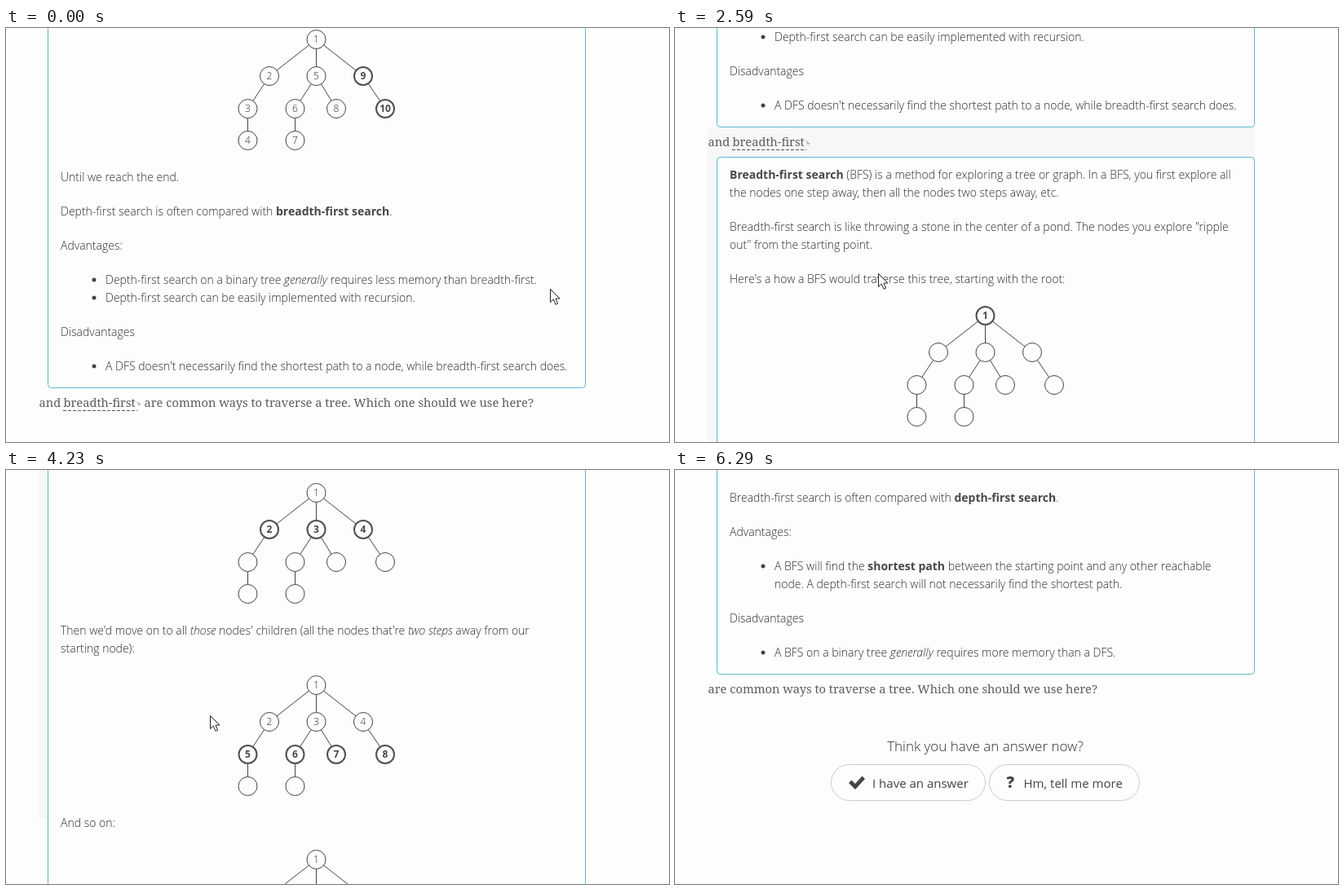
Recreate the animation shown at these times as an HTML page. Size 813 by 508 pixels, loop 6.54 s.

```html
<!DOCTYPE html>
<html lang="en">
<head>
<meta charset="utf-8">
<title>Tree traversal notes</title>
<style>
  html, body { margin: 0; width: 100%; height: 100%; overflow: hidden; background: #fdfdfd; }
  svg { display: block; width: 813px; height: 508px; }
  text { font: 300 14px "Open Sans", sans-serif; fill: #2c2c2c; white-space: pre; }
  .b { font-weight: 700; fill: #484848; }
  .i { font-style: italic; }
  .num { font-size: 12px; text-anchor: middle; }
  .serif { font: 400 14.64px "Noto Serif", serif; fill: #5c5c5c; }
  .ask { font-size: 17px; text-anchor: middle; }
  .label { font-size: 15px; font-weight: 400; fill: #444; }
  .mark { font-size: 19px; font-weight: 800; fill: #444; }
  .panel { fill: #fdfdfd; stroke: #5bbad0; }
  .edge { stroke: #444; }
  .node { fill: #fdfdfd; stroke: #444; }
  .node.b { stroke: #505050; stroke-width: 2; }
  .pill { fill: #fdfdfd; stroke: #ccc; }
</style>
</head>
<body>
<svg id="stage" viewBox="0 0 813 508"></svg>
<script>
const LOOP = 6540;
const SHIFT = 1323; // how far the open panel pushes the rest down
const LINE = 22, PARA = 42;
const stage = document.getElementById('stage');

function add(parent, tag, attrs = {}, content) {
  const el = document.createElementNS('http://www.w3.org/2000/svg', tag);
  for (const k in attrs) el.setAttribute(k, attrs[k]);
  if (content !== undefined) el.textContent = content;
  parent.appendChild(el);
  return el;
}

// *bold* and _italic_ runs; y is the middle of the line
function line(parent, x, y, str) {
  const el = add(parent, 'text', { x, y: y + 5 });
  for (const run of str.split(/(\*[^*]+\*|_[^_]+_)/)) {
    if (!run) continue;
    const cls = { '*': 'b', '_': 'i' }[run[0]];
    add(el, 'tspan', cls ? { class: cls } : {}, cls ? run.slice(1, -1) : run);
  }
}

// each node: x, parent; listed level by level
const NODES = [[380.5, -1], [323, 0], [380.5, 0], [438, 0], [296.5, 1],
  [354.5, 2], [405, 2], [465, 3], [296.5, 4], [354.5, 5]];
const LEVELS = [0, 45, 85, 124];
const depth = i => i ? 1 + depth(NODES[i][1]) : 0;
const nodeY = i => LEVELS[depth(i)];

const byLevel = NODES.map((_, i) => i);
const byBranch = [];
(function visit(i) {
  byBranch.push(i);
  byLevel.filter(k => NODES[k][1] === i).forEach(visit);
})(0);

// numbers nodes 1..last in visiting order, the ones from first on in bold
function tree(parent, y, order, first, last) {
  const g = add(parent, 'g', { transform: `translate(0 ${y})` });
  NODES.forEach(([x, up], i) => {
    if (i) add(g, 'line', { class: 'edge', x1: NODES[up][0], y1: nodeY(up), x2: x, y2: nodeY(i) });
  });
  NODES.forEach(([x], i) => {
    const n = order.indexOf(i) + 1;
    const bold = n >= first && n <= last;
    const weight = bold ? ' b' : '';
    add(g, 'circle', { class: 'node' + weight, cx: x, cy: nodeY(i), r: bold ? 11 : 11.5 });
    if (n <= last) add(g, 'text', { class: 'num' + weight, x, y: nodeY(i) + 4.3 }, n);
  });
}

// stacks paragraphs, "- " lists and trees downwards from y
function flow(parent, y, blocks) {
  for (const block of blocks) {
    if (Array.isArray(block)) {
      tree(parent, y + 3, ...block);
      y += 172;
      continue;
    }
    const rows = block.split('\n');
    const list = rows[0].startsWith('- ');
    rows.forEach((row, i) => {
      const cy = y + LINE * i;
      const dot = row.startsWith('- ');
      if (dot) add(parent, 'circle', { cx: 108, cy, r: 2.5, fill: '#444' });
      line(parent, list ? 122 : 67, cy, dot ? row.slice(2) : row);
    });
    y += LINE * (rows.length - 1) + PARA;
  }
}

function panel(parent, top, bottom) {
  add(parent, 'rect', { class: 'panel', x: 51.5, y: top, width: 659, height: bottom - top, rx: 4 });
}

const page = add(stage, 'g');

panel(page, -600.5, 441.5);
flow(page, 11, [
  [byBranch, 9, 10],
  'Until we reach the end.',
  'Depth-first search is often compared with *breadth-first search*.',
  'Advantages:',
  '- Depth-first search on a binary tree _generally_ requires less memory than breadth-first.\n' +
  '- Depth-first search can be easily implemented with recursion.',
  'Disadvantages',
  "- A DFS doesn't necessarily find the shortest path to a node, while breadth-first search does."
]);

const more = add(page, 'g');
add(more, 'rect', { x: 40, y: 442, width: 671, height: 844, fill: '#f7f7f7' });
panel(more, 478.5, 1764.5);
flow(more, 500, [
  '*Breadth-first search* (BFS) is a method for exploring a tree or graph. In a BFS, you first explore all\n' +
  'the nodes one step away, then all the nodes two steps away, etc.',
  'Breadth-first search is like throwing a stone in the center of a pond. The nodes you explore "ripple\n' +
  'out" from the starting point.',
  "Here's a how a BFS would traverse this tree, starting with the root:",
  [byLevel, 1, 1],
  "We'd visit all the immediate children (all the nodes that're one step away from our starting node):",
  [byLevel, 2, 4],
  "Then we'd move on to all _those_ nodes' children (all the nodes that're _two steps_ away from our\n" +
  'starting node):',
  [byLevel, 5, 8],
  'And so on:',
  [byLevel, 9, 10],
  'Until we reach the end.',
  'Breadth-first search is often compared with *depth-first search*.',
  'Advantages:',
  '- A BFS will find the *shortest path* between the starting point and any other reachable\n' +
  'node. A depth-first search will not necessarily find the shortest path.',
  'Disadvantages',
  '- A BFS on a binary tree _generally_ requires more memory than a DFS.'
]);

// sentence with the expandable term
add(page, 'text', { class: 'serif', x: 40.5, y: 465 }, 'and');
add(page, 'text', { class: 'serif', x: 70.5, y: 465 }, 'breadth-first');
add(page, 'path', { d: 'M70 469.5H161', stroke: '#555', 'stroke-dasharray': '4 2' });
add(page, 'path', { d: 'M160.5 459q3 0 3 3.5m-2 -1.5l2 2l2 -2', fill: 'none', stroke: '#7fa9b2' });

const tail = add(page, 'g');
const rest = add(tail, 'text', { class: 'serif', y: 465 },
  'are common ways to traverse a tree. Which one should we use here?');
add(tail, 'text', { class: 'ask', x: 380.5, y: 536 }, 'Think you have an answer now?');
add(tail, 'rect', { class: 'pill', x: 191.5, y: 552.5, width: 189, height: 44, rx: 22 });
add(tail, 'rect', { class: 'pill', x: 385.5, y: 552.5, width: 184, height: 44, rx: 22 });
add(tail, 'path', { d: 'M213 575l3.5 -3.5l4.5 4.5l8.5 -9.5l3.5 3.5l-12 13z', fill: '#444' });
add(tail, 'text', { class: 'label', x: 242, y: 581 }, 'I have an answer');
add(tail, 'text', { class: 'mark', x: 406.5, y: 581 }, '?');
add(tail, 'text', { class: 'label', x: 427.5, y: 581 }, 'Hm, tell me more');

const arrow = add(stage, 'path', {
  d: 'M.5 .5V16.5L4.3 13L7 19.3L9.6 18.2L7 12H12z', fill: '#fff', stroke: '#222', 'stroke-linejoin': 'round'
});
const beam = add(stage, 'path', {
  d: 'M-3.5 -7.5H-1L.5 -6.5L2 -7.5H4M.5 -6.5V6.5M-3.5 7.5H-1L.5 6.5L2 7.5H4', fill: 'none', stroke: '#222'
});

// what each gesture reaches, in updates about STEP ms apart
const STEP = 137;
const REST = { scroll: 0, x: 667, y: 320 };
const GESTURES = [
  { from: 130, to: 550, scroll: 114 },
  { from: 820, to: 820, x: 656, y: 318 },
  { from: 940, to: 1480, x: 120, y: 344 },
  { from: 1900, to: 2020, x: 201, y: 313 },
  { from: 2170, to: 2590, scroll: 320, x: 249, y: 301 },
  { from: 2900, to: 3170, scroll: 489 },
  { from: 3420, to: 3840, scroll: 740 },
  { from: 3960, to: 4230, scroll: 859, x: 250 },
  { from: 4380, to: 4500, scroll: 980 },
  { from: 4810, to: 5230, scroll: 1279, x: 251 },
  { from: 5350, to: 5620, scroll: 1514 },
  { from: 5870, to: 6150, x: 704, y: 490 }
];

function pose(t) {
  const now = { ...REST };
  for (const { from, to, ...goal } of GESTURES) {
    if (t < from) break;
    const n = Math.round((to - from) / STEP);
    const i = t >= to ? n : Math.floor((t - from) / (to - from) * n);
    for (const k in goal) now[k] += Math.round((goal[k] - now[k]) * (i + 1) / (n + 1));
  }
  return now;
}

const show = (el, on) => el.setAttribute('visibility', on ? 'visible' : 'hidden');
const move = (el, x, y) => el.setAttribute('transform', `translate(${x} ${y})`);

function draw(t) {
  const { scroll, x, y } = pose(t);
  const open = t >= 1620;
  const typing = t >= 820 && t < 1480;

  move(page, 0, -scroll);
  show(more, open);
  move(tail, 0, open ? SHIFT : 0);
  rest.setAttribute('x', open ? 40.5 : 169.5);
  move(arrow, x, y);
  move(beam, x, y);
  show(arrow, !typing && t < 6290);
  show(beam, typing);
}

const start = performance.now();
function tick() {
  draw((performance.now() - start) % LOOP);
  requestAnimationFrame(tick);
}
tick();
</script>
</body>
</html>
```
